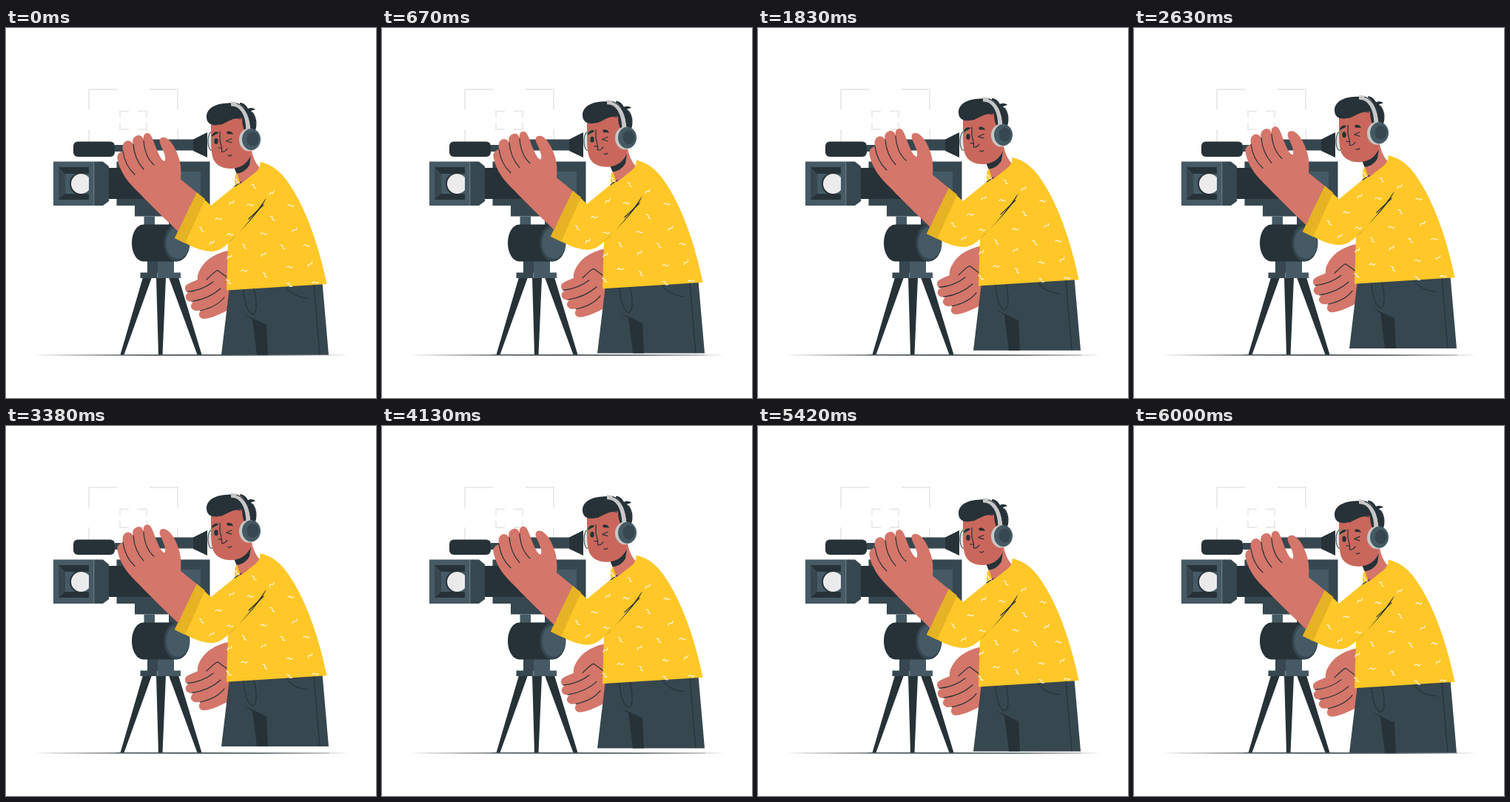
Animation of 500 by 500 pixels, one loop 6.04 s. Source, as an HTML page:

```html
<!DOCTYPE html>
<html lang="en">
<head>
<meta charset="utf-8">
<title>Camera operator</title>
<style>
  html, body { margin: 0; width: 100%; height: 100%; overflow: hidden; background: #fff; }
  svg { display: block; width: 100vw; height: 100vh; }
  .dark { fill: #263238; }
  .mid { fill: #37474f; }
  .light { fill: #455a64; }
  .skin { fill: #d4766a; }
  .face { fill: #ca675c; }
  .shirt { fill: #ffc727; }
  .line { fill: none; stroke: #263238; stroke-width: 1.2; stroke-linecap: round; stroke-linejoin: round; }
  .frame { fill: none; stroke: #ebebeb; stroke-width: 2; }
  .mark { fill: none; stroke: #fff; stroke-width: 1.1; stroke-linecap: round; }
</style>
</head>
<body>
<svg viewBox="0 0 500 500" xmlns="http://www.w3.org/2000/svg">
  <!-- viewfinder and ground -->
  <path class="frame" d="M112 110V83H150M194 83H232V110M112 137V164H150M194 164H232V137"/>
  <path class="frame" d="M154 121V112.500H166M178 112.500H190V121M154 128V137H166M178 137H190V128"/>
  <path class="dark" d="M36 442Q140 441.200 250 441.200T466 442Q360 442.700 250 442.700T36 442Z"/>

  <!-- tripod -->
  <path class="dark" d="M185 337H197L159.500 441.500H154.500ZM203 337H216L211.500 441.500H206ZM220 337H233L264.500 441.500H258.500Z"/>
  <path class="mid" d="M191 315H205V331H191ZM181.500 330.500H205V338H181.500Z"/>
  <path class="light" d="M205 315H227V331H205ZM205 330.500H236V338H205Z"/>
  <path d="M204.700 331V338" stroke="#a6b0b5" stroke-width=".7"/>
  <path class="mid" d="M174 239H236V254.500H174ZM220 254H236V267H220Z"/>
  <path class="light" d="M186.500 254.500H201V267H186.500Z"/>
  <path class="dark" d="M186 265.500H231V315.500H186C176 315.500 170 303 170 290.500S176 265.500 186 265.500Z"/>
  <ellipse class="mid" cx="231" cy="290.500" rx="17.500" ry="25"/>
  <ellipse class="light" cx="232" cy="290.500" rx="15.500" ry="21.500"/>

  <!-- camera -->
  <path class="mid" d="M147 158H190V167H147ZM185 150.500H255V165.500H185Z"/>
  <rect class="dark" x="91" y="153.500" width="56" height="20.500" rx="6"/>
  <path class="dark" d="M253 150.500L272 141V175L253 166Z"/>
  <ellipse cx="277.500" cy="153" rx="4.500" ry="12.500" fill="#dfe3e5" stroke="#263238"/>
  <path class="mid" d="M149.500 180.500H275.500V240H149.500Z"/>
  <path class="dark" d="M138 189H236V231H138Z"/>
  <path class="light" d="M225 194H263V240H225Z"/>
  <path class="mid" d="M119 180.500H131L139 187V234L131 240H119Z"/>
  <path class="light" d="M64 180.500H119V240H64Z"/>
  <path class="dark" d="M71 188H112V232H71Z"/>
  <path class="mid" d="M71 188L80 197V224L71 232Z"/>
  <path class="light" d="M80 197H112V224H80Z"/>
  <ellipse class="dark" cx="100" cy="210.500" rx="14" ry="15"/>
  <ellipse cx="101.500" cy="210.500" rx="13.500" ry="13.500" fill="#ebebeb"/>
  <path class="light" d="M112 181H119V240H112Z"/>
  <path d="M118.800 181V240" stroke="#8b989e" stroke-width=".7"/>

  <g id="man">
    <!-- lower hand -->
    <path class="skin" d="M304 300C288 303 276 309 268 318C262 325 258 333 259 340C250 344 242 346 242 351C242 355 244 357 247 357
      C242 360 242 364 244 367C246 370 250 370 254 369C249 373 249 378 252 380C255 383 259 382 264 381C259 386 260 392 267 393C276 393 291 386 304 379Z"/>
    <path class="line" d="M245 356.500C260 355 271 350 280 343M251 369.500C267 367 280 361 290 352M262 382C276 379 288 373 295 364"/>
    <path class="line" stroke-width="1.600" d="M271 340C277 334 282 329 286 327.500L299 337"/>

    <!-- trousers -->
    <path class="mid" d="M302 350L427.500 344L436 441.800H291Z"/>
    <path class="dark" d="M322 387L335 393L352 401L354 441.800H339L333 394Z"/>
    <path class="line" d="M321 353C322 370 326 383 333 387C340 386 339 370 335 352M378 349C384 358 394 364 407 365M416 347L424 441"/>

    <!-- neck -->
    <path class="skin" d="M309 185L316 214L345 196L342 188C336 181 333 172 331 160Z"/>
    <path class="dark" d="M308 188C319 187 327 181 331 172L329 185C325 192 319 196 311.500 196.500Z"/>

    <!-- shirt -->
    <path class="shirt" d="M312 196C309 200 308 206 310 213L277 240L257.500 222L228 284L243 291C256 298 268 302 279 302C287 301 294 297 300 291
      L298 354.500L433.500 346C424 300 408 250 386 216C376 199 363 185 343.500 181C344 190 339 194 332 199L317 211Z"/>
    <path fill="#e5b323" d="M257.500 222L269 231L242 291L228 284Z"/>
    <path class="dark" d="M300 291C319 274 338 250 351.500 229.500C347 243 326 266 300 291Z"/>
    <path class="line" d="M328 258L348 239"/>
    <path class="line" stroke-width=".8" d="M309 214L318 208"/>
    <g id="marks" class="mark"></g>

    <!-- raised hand -->
    <path class="skin" d="M257.500 222L236 204.500C237 192 236 182 233 174C229 161 221 149 214 148C208 147 206 152 209 158C213 167 217 175 214.500 180
      C209 179 206 169 202 160C198 149 196 142 191 142C187 142 185 146 186 152C185 146 181 144 177 145.500C172 147 170 152 172 158
      C170 153 166 151 162 153C158 155 157 160 158 166C152 168 149 172 151 179C155 196 165 209 180 223C199 243 218 261 232.500 275Z"/>
    <path class="line" d="M186 152C187 166 192 178 200 185M172 157C173 171 178 182 186 191M158 166C160 180 166 191 174 198"/>

    <!-- head -->
    <path class="face" d="M277 128V152C277 162 278 171 280 177C284 186 294 190.500 305 190C320 189 330 180 331 166V130L314 114Z"/>
    <path class="dark" d="M271 120C271 109 282 102 300 101.500C306 101 311 102 315 104C317 102 315 101 317 101C321 101 325 105 327 109C330 107 335 108 337 110
      C335 111 333 111 331 112C337 119 339 128 337 138H322C320 133 319 128 319 122C309 120 301 125 291 130C281 133 271 131 271 120Z"/>
    <path class="line" stroke-width=".7" d="M291 130C302 125 310 119 317 123M333 114C339 122 339 132 336 139"/>
    <path d="M304 102.500C319 102 327 117 327.500 139" fill="none" stroke="#c7c7c7" stroke-width="6"/>
    <path class="line" stroke-width=".8" d="M312 102C324 106 330 120 331 137"/>
    <ellipse cx="328.500" cy="151" rx="13.500" ry="15.500" fill="#c7c7c7"/>
    <ellipse class="light" cx="331.500" cy="150.500" rx="12.500" ry="14.500"/>
    <ellipse class="mid" cx="333.500" cy="150" rx="8" ry="9.500"/>

    <path class="dark" d="M278 145C280 141 284 139 287 141C286 144 281 144 279 147ZM298 141C301 138 306 140 307 144C304 143 301 144 299 143Z"/>
    <ellipse class="dark" cx="284" cy="153" rx="2.700" ry="4"/>
    <path class="line" d="M298 152.500L305 149.500M298 153L305 155M289 140V151L291.500 162H287M291.500 162V167C295 168 297 166 299 163M300 172C302 173.500 304 172.500 305 171.500"/>
  </g>
</svg>
<script>
  const LOOP = 6040, RISE = 10;
  const man = document.getElementById('man');

  // x, y, angle
  const marks = [
    [335, 214, 55], [359, 223, -30], [305, 236, -30], [330, 239, 8], [385, 240, 8],
    [287, 258, 5], [360, 257, 55], [264, 272, 55], [390, 273, -30], [348, 278, 8],
    [278, 290, -30], [303, 279, 10], [322, 295, 60], [374, 296, 55], [406, 294, 8],
    [348, 306, -30], [322, 328, 5], [350, 334, 60], [383, 323, 8], [411, 319, -35],
    [302, 309, -30], [418, 344, 5], [383, 347, 45], [301, 343, 50], [312, 207, 50]
  ];
  document.getElementById('marks').innerHTML = marks.map(([x, y, a]) =>
    `<path transform="translate(${x} ${y}) rotate(${a})" d="M-4 1Q-2 -2 0 0T4 -1"/>`).join('');

  function draw(now) {
    const phase = (now % LOOP) / LOOP;
    const lift = RISE * (1 - Math.abs(1 - 2 * phase));
    man.setAttribute('transform', `translate(0 ${-lift.toFixed(3)})`);
    requestAnimationFrame(draw);
  }
  draw(0);
</script>
</body>
</html>
```
